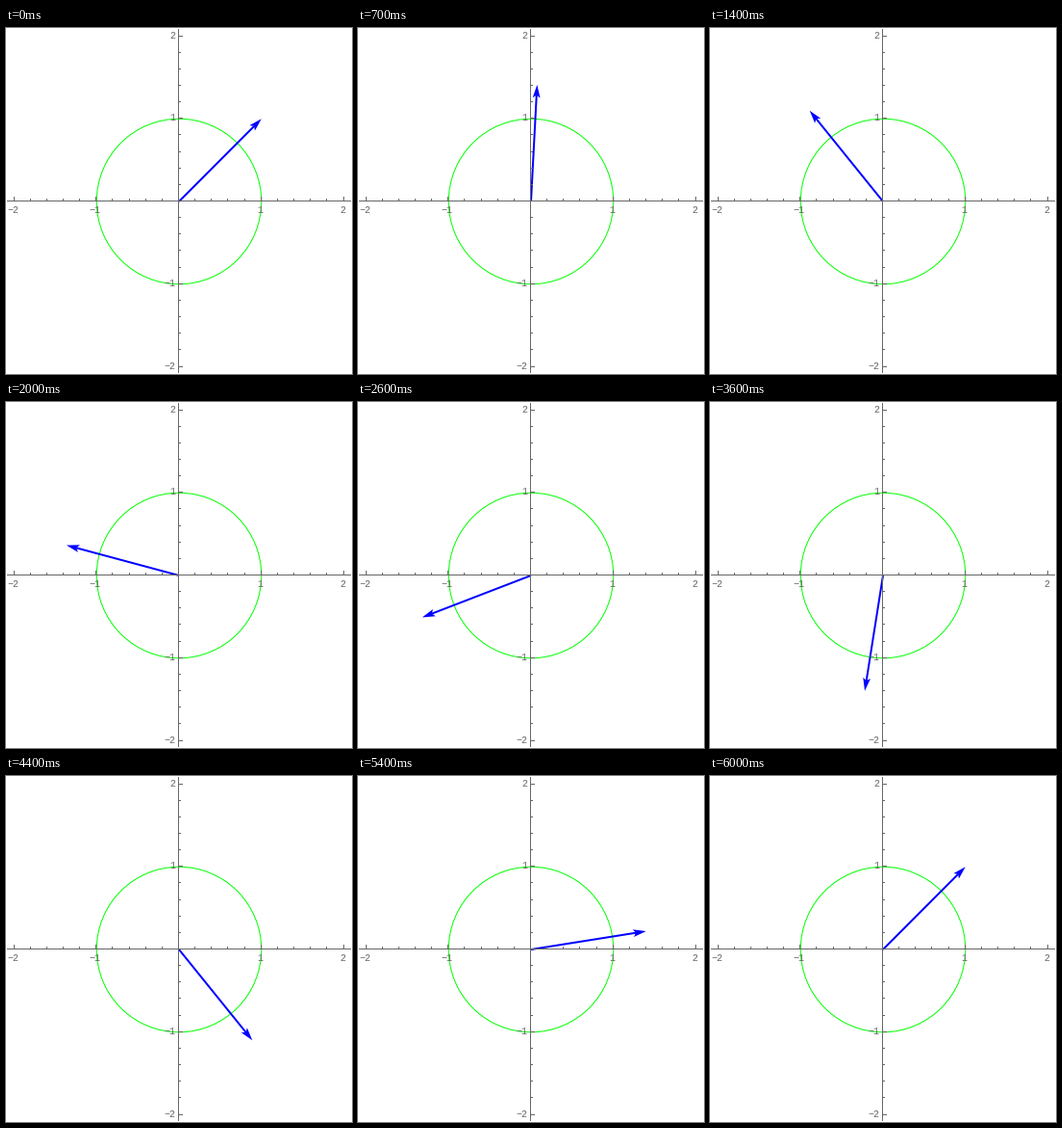
A matplotlib script for the animation above (6100 ms loop, 360 px wide and 359 px high).

```python
import numpy as np
import matplotlib.pyplot as plt
from matplotlib.animation import FuncAnimation
from matplotlib.patches import Circle, Polygon

W, H, DPI = 360, 359, 64
FRAMES, INTERVAL = 61, 100
CENTRE = np.array([180.0, 180.0])
UNIT = 85.75
AXIS = 179.5  # both axes run along the middle of a pixel row
GRAY, GREEN, BLUE = "#666666", "#00ff00", "#0000ff"
PT = 72 / DPI  # points per pixel

fig = plt.figure(figsize=(W / DPI, H / DPI), dpi=DPI, facecolor="white")
ax = fig.add_axes([0, 0, 1, 1])
ax.set_xlim(0, W)
ax.set_ylim(H, 0)
ax.axis("off")


def line(x0, y0, x1, y1):
    ax.plot([x0, x1], [y0, y1], color=GRAY, lw=PT, zorder=4,
            solid_capstyle="butt", snap=False)


def label(x, y, value, ha):
    text = str(value).replace("-", "\u2212")
    ax.text(x, y, text, ha=ha, va="baseline", color=GRAY, zorder=5,
            family="Liberation Mono", fontsize=10 * PT)


def pixel_mid(v):
    return np.floor(v) + 0.5


def draw_axes():
    line(1, AXIS, W - 1, AXIS)
    line(AXIS, 1, AXIS, H - 1)
    for k in range(-10, 11):
        if k == 0:
            continue
        major = k % 5 == 0
        size = 4.5 if major else 2.5
        x = pixel_mid(AXIS + k / 5 * UNIT)
        y = pixel_mid(AXIS - k / 5 * UNIT)
        line(x, AXIS, x, AXIS - size)
        line(AXIS, y, AXIS + size, y)
        if major:
            label(x - 1, 192, k // 5, "center")
            label(176, y + 2.5, k // 5, "right")


# Arrowhead pointing along +x with its tip at the origin
HEAD = np.array([[0, 0], [-13.5, 3.9], [-10.8, 0], [-13.5, -3.9]])

draw_axes()
ax.add_patch(Circle(CENTRE, UNIT, fill=False, ec=GREEN, lw=PT, zorder=2))
shaft, = ax.plot([], [], color=BLUE, lw=2 * PT, zorder=3,
                 solid_capstyle="butt", snap=False)
head = ax.add_patch(Polygon(HEAD, fc=BLUE, ec="none", zorder=3))


def update(i):
    angle = np.radians(45 + 6 * i)
    c, s = np.cos(angle), np.sin(angle)
    along = np.array([c, -s])
    across = np.array([s, c])
    tip = CENTRE + np.sqrt(2) * UNIT * along
    end = tip - 10.8 * along
    shaft.set_data([CENTRE[0], end[0]], [CENTRE[1], end[1]])
    head.set_xy(tip + np.outer(HEAD[:, 0], along) + np.outer(HEAD[:, 1], across))
    return shaft, head


anim = FuncAnimation(fig, update, frames=FRAMES, interval=INTERVAL,
                     repeat=True, repeat_delay=0)
plt.show()
```
